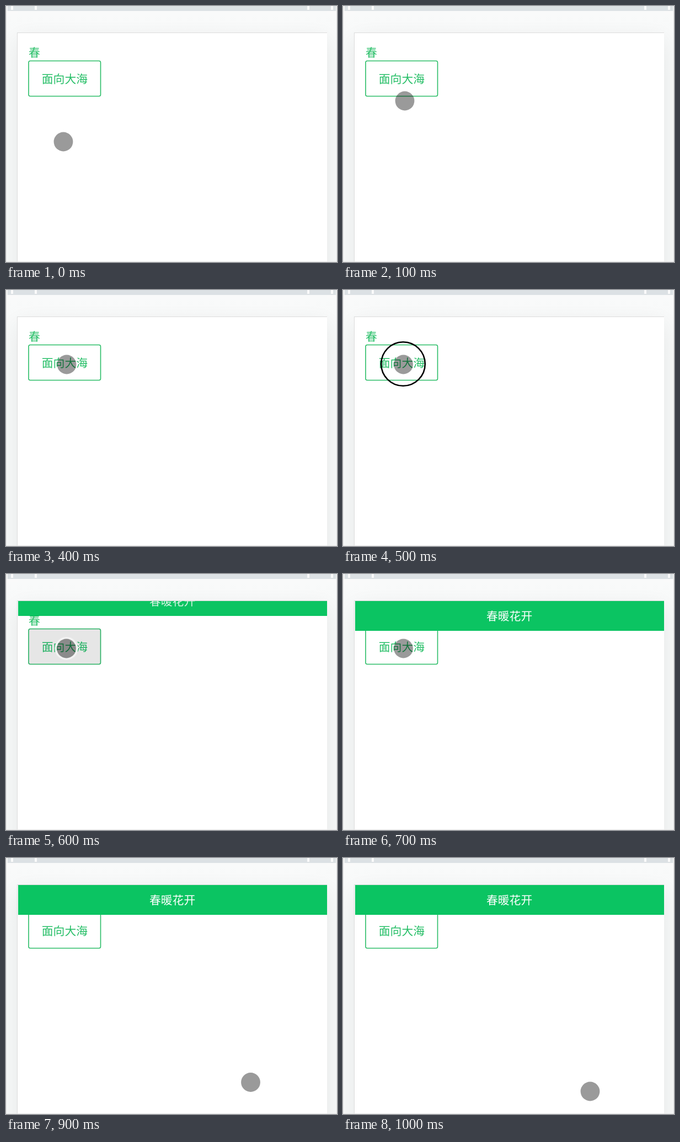
An HTML page with a canvas that plays this animation: 600x464 px, repeating every 1100 ms.

```html
<!DOCTYPE html>
<html lang="zh-CN">
<head>
<meta charset="utf-8">
<style>
html, body { margin: 0; width: 100%; height: 100%; overflow: hidden; }
canvas { display: block; }
</style>
</head>
<body>
<canvas id="stage" width="600" height="464"></canvas>
<script>
const ctx = document.getElementById('stage').getContext('2d');
const STEP = 100, LOOP = 1100;
const GREEN = '#07c160';

// Pointer centre at each step
const path = [
  [104, 246], [112, 172], [113, 137], [111, 136], [110, 135], [109.5, 135],
  [109.5, 135], [109.5, 135], [345, 285], [443.5, 406.5], [448, 423]
];

function rect(x, y, w, h, color) {
  ctx.fillStyle = color;
  ctx.fillRect(x, y, w, h);
}

function text(str, x, y, color) {
  ctx.font = '20.8px "Noto Sans CJK SC", "Noto Sans CJK", sans-serif';
  ctx.textAlign = 'center';
  ctx.fillStyle = color;
  ctx.fillText(str, x, y);
}

function circle(x, y, r) {
  ctx.beginPath();
  ctx.arc(x, y, r, 0, Math.PI * 2);
}

function drawPage() {
  const bg = ctx.createLinearGradient(0, 9, 0, 130);
  bg.addColorStop(0, '#fafafa');
  bg.addColorStop(1, '#f7f8f8');
  rect(0, 0, 600, 464, bg);
  ctx.save();
  ctx.shadowColor = 'rgba(0,10,10,.07)';
  ctx.shadowBlur = 36;
  ctx.shadowOffsetY = 10;
  rect(21, 49, 561, 500, '#fff');
  ctx.restore();
  rect(20, 48, 562, 1, '#dcdcdc');
  rect(20, 48, 1, 416, '#dcdcdc');

  rect(0, 0, 600, 9, '#dce1e4');
  for (const x of [9, 52, 546, 589]) rect(x, 0, 4, 7, '#fafafa');
  rect(0, 0, 3, 9, '#f4f5f5');
  rect(598, 0, 2, 9, '#f4f5f5');
  rect(0, 0, 1, 464, '#e6e6e6');
  rect(599, 0, 1, 464, '#e6e6e6');
  rect(0, 463, 600, 1, '#e6e6e6');
}

function drawButton(pressed) {
  ctx.beginPath();
  ctx.roundRect(41, 99.5, 130.5, 64, 3);
  ctx.fillStyle = pressed ? '#e6e6e6' : '#fff';
  ctx.fill();
  ctx.strokeStyle = pressed ? '#27b062' : '#2abd66';
  ctx.lineWidth = 1.6;
  ctx.stroke();
  text('面向大海', 106.4, 140.4, pressed ? '#1fb060' : '#25be66');
}

function drawHeader(shift) {
  ctx.save();
  ctx.beginPath();
  ctx.rect(22, 49, 560, 54);
  ctx.clip();
  rect(22, 49 + shift, 560, 54, '#0bc462');
  text('春暖花开', 301.6, 83.9 + shift, shift ? '#d8f4e4' : '#fff');
  ctx.restore();
}

function drawPointer(step) {
  const [x, y] = path[step];
  if (step === 5) {
    circle(x - 0.5, y - 1, 39.8);
    ctx.strokeStyle = '#000';
    ctx.lineWidth = 2.6;
    ctx.stroke();
  }
  if (step === 6) {
    circle(x, y, 19.2);
    ctx.strokeStyle = '#f3f3f3';
    ctx.lineWidth = 3.6;
    ctx.stroke();
  }
  circle(x, y, 17.4);
  ctx.fillStyle = 'rgba(0,0,0,.395)';
  ctx.fill();
}

function draw(now) {
  const step = Math.floor((now % LOOP) / STEP);
  drawPage();
  text('春', 51.5, 91.6, '#25be66');
  drawButton(step === 6);
  if (step >= 6) drawHeader(step === 6 ? -27 : 0);
  drawPointer(step);
}

let start;
function tick() {
  const now = performance.now();
  start ??= now;
  draw(now - start);
  requestAnimationFrame(tick);
}
tick();
</script>
</body>
</html>
```
